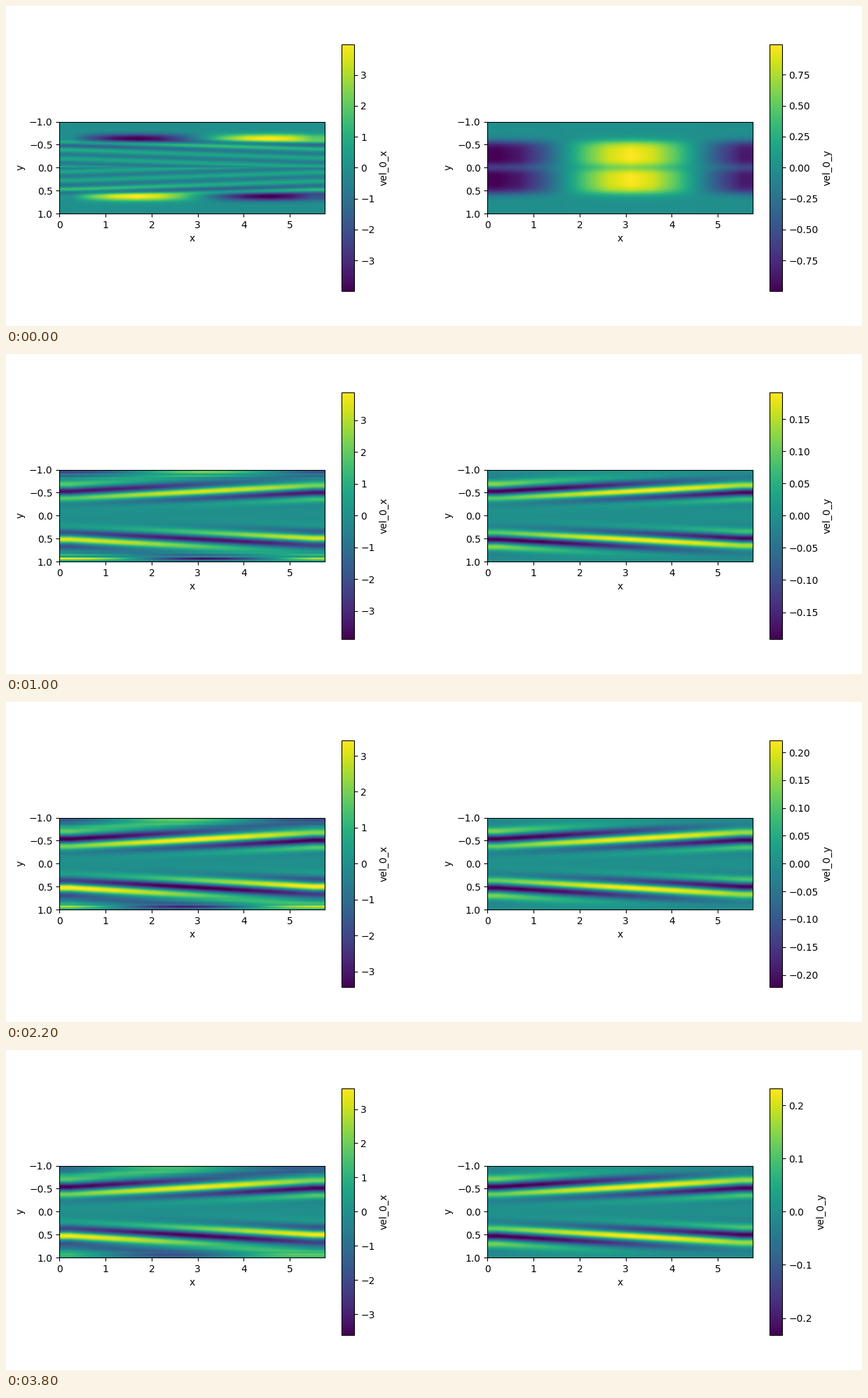
Recreate the animation shown at these times as a matplotlib script. Size 1222 by 458 pixels, loop 4000 ms.

```python
import numpy as np
import matplotlib.pyplot as plt
from matplotlib.animation import FuncAnimation

W, H, DPI = 1222, 458, 100
FRAMES = 20

plt.rcParams.update({"font.family": "DejaVu Sans", "font.size": 10})

# Twelve Fourier points along x, a fine grid across the channel
x = np.arange(12) * np.pi / 6
X, Y = np.meshgrid(x, np.linspace(-1, 1, 128))
S, SIDE = np.abs(Y), np.sign(Y)


def bump(center, width):
    return np.exp(-((S - center) / width) ** 2)


def step(edge, width):
    """Smooth step over the distance from the centre line, 0 to 1."""
    return 1 / (1 + np.exp((edge - S) / width))


def start_state():
    """Broad vortex pair with shear layers, and the colour limits."""
    v = -np.cos(X) * (1 - step(0.56, 0.05)) * (1 - 0.35 * bump(0, 0.1))
    lobes = 4 * np.sin(X) * bump(0.64, 0.095)
    ripple = 1.3 * bump(0.5, 0.1) + 0.7 * (1 - step(0.45, 0.03))
    u = SIDE * (lobes - ripple * np.cos(X + 33 * (S - 0.57)))
    return (u, 3.985), (v, 0.995)


def band_state(t):
    """Tilted wave bands plus thin wall layers, and the colour limits."""
    u_limit = np.interp(t, [2, 3, 5, 7, 9, 11, 19],
                        [6.16, 5.59, 3.88, 3.6, 3.97, 3.43, 3.604])
    v_limit = np.interp(t, [2, 5, 9, 11, 12, 19],
                        [0.195, 0.1913, 0.2037, 0.2214, 0.2253, 0.2316])
    young = np.exp((3 - t) / 4)
    burst = np.exp(3 - t)

    d = np.minimum(S - 0.355, 0.54)
    wave = np.cos(X - (18 + 2.2 * young) * d + 4 * d ** 2)
    v = 1.02 * v_limit * bump(0.55, 0.235 - 0.03 * young) * wave

    plateau = (0.4 - 0.28 * young) * step(0.7, 0.03)
    envelope = np.maximum(bump(0.53, 0.225 - 0.03 * young), plateau)
    bands = (3.6 - 0.4 * burst) * envelope * wave

    wall = 3.6 * (1 - t / 22) + 2.4 * burst
    layer = np.where(Y > 0, bump(0.945, 0.025),
                     0.6 * (1 - t / 20) * bump(0.95, 0.045))
    fine = (0.2 + 1.3 * young) * bump(0.87, 0.06) * np.sin(75 * S)
    shift = 0.9 * burst - 0.04 * (t - 5)
    u = SIDE * ((wall * layer + fine) * np.cos(X - shift) - bands)
    return (u, u_limit), (v, v_limit)


def panel(sub, name):
    ax = sub.subplots()
    im = ax.imshow(np.zeros_like(X), extent=(0, x[-1], 1, -1),
                   cmap="viridis", interpolation="bilinear", vmin=-1, vmax=1)
    ax.set(xlabel="x", ylabel="y")
    sub.colorbar(im, ax=ax, label=name)
    return im


fig = plt.figure(figsize=(W / DPI, H / DPI), dpi=DPI, facecolor="white")
left, right = fig.subfigures(1, 2)
images = [panel(left, "vel_0_x"), panel(right, "vel_0_y")]


def update(i):
    # The second state is held for two frames
    state = band_state(max(i, 2)) if i else start_state()
    for im, (data, limit) in zip(images, state):
        im.set_data(data)
        im.set_clim(-limit, limit)
    return images


anim = FuncAnimation(fig, update, frames=FRAMES, init_func=lambda: update(0),
                     interval=200, repeat=True, repeat_delay=0, blit=False)
plt.show()
```
